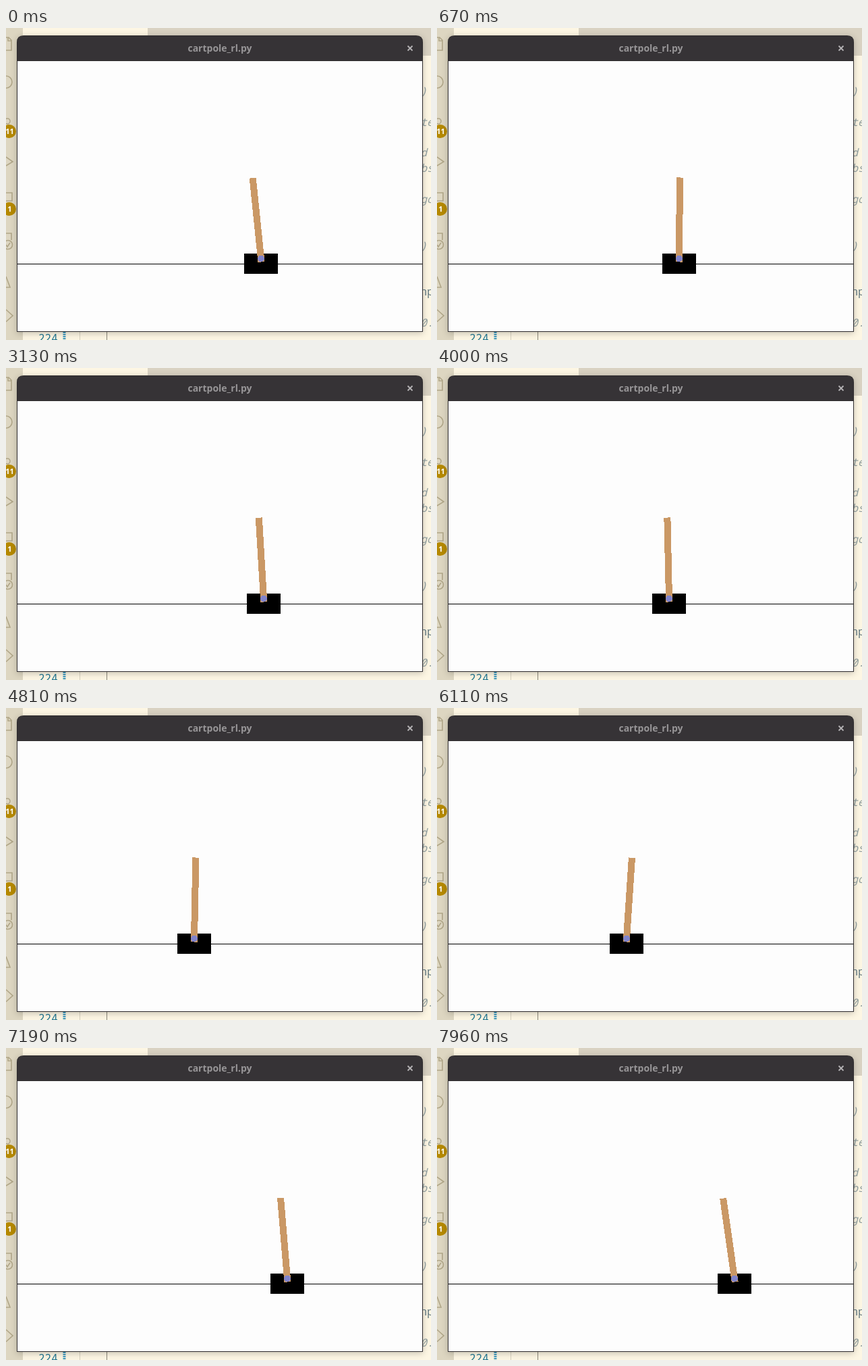
These frames come from a looping animation (630x462 px, 7.99 s). An HTML page:

```html
<!DOCTYPE html>
<html lang="en">
<head>
<meta charset="utf-8">
<title>Cart pole</title>
<style>
  html, body { margin: 0; width: 100%; height: 100%; overflow: hidden; background: #fdf6e3; }
  svg { display: block; width: 630px; height: 462px; }
  .code { font: 16px "Noto Sans Mono", "DejaVu Sans Mono", monospace; fill: #657b83; white-space: pre; }
  .comment { font-style: italic; fill: #93a1a1; }
  .line-number { fill: #237893; }
  .badge { font: bold 11px "Noto Sans", sans-serif; fill: #fff; text-anchor: middle; }
  .title { font: bold 14px "Noto Sans", sans-serif; fill: #979597; text-anchor: middle; }
  .icons { fill: none; stroke: #b0a688; stroke-width: 1.6; }
  .window { filter: drop-shadow(0 2px 5px rgba(0, 0, 0, .22)); }
</style>
</head>
<body>
<svg viewBox="0 0 630 462">
  <!-- editor behind the window -->
  <rect width="630" height="462" fill="#fdf6e3"/>
  <rect width="25" height="462" fill="#ddd6c1"/>
  <rect x="210" width="420" height="41" fill="#d9d2c2"/>
  <g class="icons">
    <path d="M0 14H4L8 18V33H0M3 14V19H8"/>
    <circle cx="0" cy="80" r="9"/>
    <circle cx="2" cy="138" r="4"/>
    <path d="M0 191L10 198L0 204"/>
    <path d="M0 244H9V256H0"/>
    <path d="M0 304H8V314"/>
    <circle cx="3" cy="321" r="6.5"/>
    <path d="M0 321L2 324L6 318"/>
    <path d="M0 368L6 384H0"/>
    <path d="M0 417L10 426L0 435"/>
  </g>
  <g fill="#b58900">
    <circle cx="5" cy="153" r="10"/>
    <circle cx="5" cy="268" r="10"/>
  </g>
  <text class="badge" x="5.5" y="157">11</text>
  <text class="badge" x="5.5" y="272">1</text>
  <g id="code" class="code">
    <text class="line-number" x="48" y="465">224</text>
  </g>
  <path d="M86.5 450V462" stroke="#3f9ac0" stroke-width="4" stroke-dasharray="2 1"/>
  <path d="M109.5 450V462" stroke="#d8d2c0"/>
  <path d="M149.5 450V462" stroke="#8a8678"/>

  <g class="window">
    <path d="M16 450V21Q16 11 26 11H608Q618 11 618 21V450Z" fill="#2f2c2e"/>
    <path d="M17 48V21Q17 12 26 12H608Q617 12 617 21V48Z" fill="#363336"/>
    <text class="title" x="317" y="35">cartpole_rl.py</text>
    <path d="M595.5 26.5L602.5 33.5M602.5 26.5L595.5 33.5" stroke="#b4b2b4" stroke-width="1.8"/>
    <rect x="17" y="49" width="600" height="400" fill="#fdfdfd"/>
  </g>

  <g shape-rendering="crispEdges">
    <rect x="17" y="349" width="600" height="1"/>
    <g id="cart">
      <rect x="-25" y="334" width="50" height="30"/>
      <g transform="translate(0 341.5)">
        <rect id="pole" x="-5" y="-120" width="10" height="125" fill="#ca9865"/>
        <circle r="4.8" fill="#8184cb"/>
      </g>
    </g>
  </g>
</svg>
<script>
const LOOP = 7990;
const STEP = LOOP / 238;

// one entry per editor line, cut off by the window edge
const lines = [")", "", "te", "", " d", "bs", "", "go", "", "", ")", "", "", "np", "", "0."];
const code = document.getElementById("code");
lines.forEach((line, row) => {
  const text = document.createElementNS(code.namespaceURI, "text");
  text.setAttribute("x", 614.5);
  text.setAttribute("y", 99 + 22.85 * row);
  if (line !== "np") text.setAttribute("class", "comment");
  text.textContent = line;
  code.append(text);
});

// key poses: seconds, cart centre, pole lean in radians
const poses = [
  [0, 378, -.104], [.6, 362, 0], [1.15, 325, .08], [1.73, 356, 0],
  [2.43, 373, -.03], [3.13, 382, -.06], [4.04, 342, -.02], [4.81, 279, .02],
  [5.5, 257, .05], [6.11, 280, .067], [7.19, 417, -.083], [7.6, 443, -.1],
  [7.96, 441, -.14]
];

const cart = document.getElementById("cart");
const pole = document.getElementById("pole");

function slope(i, k) {
  const a = poses[Math.max(i - 1, 0)];
  const b = poses[Math.min(i + 1, poses.length - 1)];
  return (b[k] - a[k]) / (b[0] - a[0]);
}

// cubic Hermite curve through column k
function sample(time, k) {
  let i = 0;
  while (i < poses.length - 2 && time >= poses[i + 1][0]) i++;
  const span = poses[i + 1][0] - poses[i][0];
  const u = (time - poses[i][0]) / span;
  const v = 1 - u;
  return poses[i][k] * (1 + 2 * u) * v * v
    + poses[i + 1][k] * (3 - 2 * u) * u * u
    + span * u * v * (slope(i, k) * v - slope(i + 1, k) * u);
}

function draw(now) {
  const step = Math.floor((now % LOOP) / STEP);
  const time = (step + .28) * STEP / 1000;
  const lean = sample(time, 2) * 180 / Math.PI;
  cart.setAttribute("transform", `translate(${Math.round(sample(time, 1))} 0)`);
  pole.setAttribute("transform", `rotate(${lean.toFixed(2)})`);
}

const start = performance.now();
function tick() {
  draw(performance.now() - start);
  requestAnimationFrame(tick);
}
tick();
</script>
</body>
</html>
```
